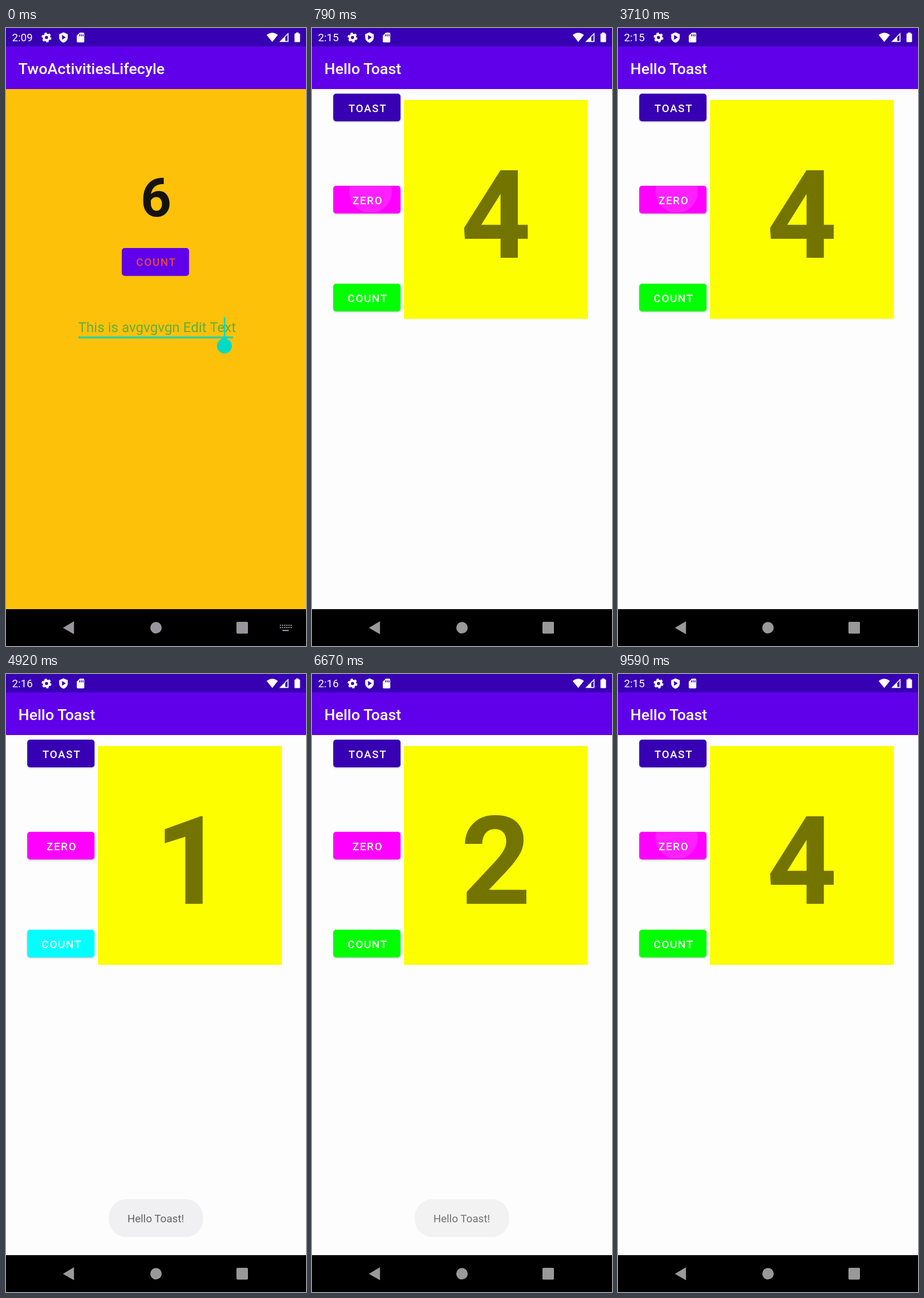
These frames come from a looping animation (522 px wide and 1073 px high, 9.79 s). An HTML page:

```html
<!DOCTYPE html>
<html lang="en">
<head>
<meta charset="utf-8">
<title>Counter app</title>
<style>
  html, body { margin: 0; width: 100%; height: 100%; overflow: hidden; background: #000; }
  svg { display: block; width: 522px; height: 1073px; font-family: Roboto, "Open Sans", sans-serif; }
  .title { font-size: 26.67px; font-weight: 500; fill: #fff; }
  .label { font-size: 18.67px; font-weight: 500; letter-spacing: 1.67px; text-anchor: middle; fill: #fff; }
  .small { font-size: 18.67px; }
  .digit { font-weight: 700; text-anchor: middle; }
  .raised { filter: drop-shadow(0 1.5px 1.5px rgba(0, 0, 0, .28)); }
</style>
</head>
<body>
<svg viewBox="0 0 522 1073">
  <defs>
    <clipPath id="zeroClip"><rect x="37" y="274" width="117" height="48" rx="5"/></clipPath>
  </defs>

  <rect id="page" width="522" height="1073" fill="#fdfdfd"/>
  <rect width="522" height="32" fill="#3700b3"/>
  <rect y="32" width="522" height="74" fill="#6000ea"/>
  <text id="clock" class="small" x="10.5" y="23" fill="#fff">2:15</text>
  <text id="title" class="title" x="21.5" y="80">Hello Toast</text>

  <!-- status icons -->
  <g fill="#fff">
    <circle cx="70.5" cy="16.5" r="4.7" fill="none" stroke="#fff" stroke-width="4"/>
    <circle cx="70.5" cy="16.5" r="7.2" fill="none" stroke="#fff" stroke-width="2.6" stroke-dasharray="4 3.54"/>
    <path d="M100 7.5l7.5 3.3v5.2c0 4.6-3.2 8.3-7.5 9.5-4.3-1.2-7.5-4.9-7.5-9.5v-5.2z"/>
    <path d="M97.5 12l6.5 4.3-6.5 4.3z" fill="#3700b3"/>
    <path d="M128.5 8h6q1.7 0 1.7 1.7v13.6q0 1.7-1.7 1.7h-9.6q-1.7 0-1.7-1.7V13.3z"/>
    <path d="M128 11v3.4M131 11v3.4M134 11v3.4" stroke="#3700b3" stroke-width="1.5"/>
    <path d="M453.5 12q9.8-7.6 19.6 0L463.3 24.3z"/>
    <path d="M475.5 24.3L491.5 8v16.3z"/>
    <path d="M486 15.5l3.8-3.6v10.7H486z" fill="#3700b3"/>
    <path d="M504.5 7.8h4.6v1.8h1.5q1 0 1 1v13q0 1-1 1H503q-1 0-1-1v-13q0-1 1-1h1.5z"/>
  </g>

  <!-- toast screen -->
  <g id="toastScreen">
    <rect x="160" y="125" width="320" height="380" fill="#fdff00"/>
    <text id="count" class="digit" x="320" y="398.5" font-size="213.3" fill="#737400"></text>
    <g class="raised">
      <rect x="37" y="114" width="117" height="48" rx="5" fill="#3700b3"/>
      <rect id="zeroButton" x="37" y="274" width="117" height="48" rx="5"/>
      <rect id="countButton" x="37" y="444" width="117" height="48" rx="5"/>
    </g>
    <circle id="ripple" cx="102" cy="284" r="37" fill="#fff" opacity=".12" clip-path="url(#zeroClip)"/>
    <text class="label" x="97" y="145.5">TOAST</text>
    <text class="label" x="97" y="305.5">ZERO</text>
    <text class="label" x="97" y="475.5">COUNT</text>
    <g id="toast">
      <rect x="179" y="912" width="164" height="65.5" rx="30" fill="#ebebee"/>
      <text class="small" x="260.5" y="952" text-anchor="middle" fill="#161616">Hello Toast!</text>
    </g>
  </g>

  <!-- edit screen -->
  <g id="editScreen">
    <text class="digit" x="261" y="327" font-size="93.3" fill="#15130c">6</text>
    <rect x="201.5" y="382" width="117" height="48.5" rx="5" fill="#6000ea"/>
    <text class="label" x="261.5" y="413" style="fill:#e94a3c">COUNT</text>
    <text x="125.5" y="527.5" font-size="24" fill="#63ad3a">This is avgvgvgn Edit Text</text>
    <rect x="126" y="535.5" width="269" height="3.5" fill="#2fcfa4"/>
    <path d="M379 502h2.6v36H379z" fill="#03dac5"/>
    <path d="M380 536.5l9.2 6.3a13 13 0 1 1-18.4 0z" fill="#03dac5"/>
  </g>

  <!-- navigation bar -->
  <rect y="1009" width="522" height="64"/>
  <g id="nav">
    <path d="M99 1041.5l19.3-11.5v22.5z"/>
    <circle cx="261" cy="1041.3" r="10"/>
    <rect x="401" y="1031" width="20" height="20.5" rx="1.8"/>
  </g>
  <g id="keyboard" stroke="#9a949f" stroke-width="2.2" fill="none">
    <path d="M476.5 1037h21M476.5 1041h21" stroke-dasharray="2.2 1.5"/>
    <path d="M481 1046h11"/>
  </g>
</svg>
<script>
const LOOP = 9790;
const el = id => document.getElementById(id);
const show = (id, on) => el(id).setAttribute("visibility", on ? "visible" : "hidden");
const fill = (id, color) => el(id).setAttribute("fill", color);

// Bursts of flicker: first change, last change, number of changes
const bursts = [
  [40, 790, 19], [840, 1000, 5], [1040, 1960, 21], [2040, 2250, 5], [2380, 3000, 12],
  [3090, 3250, 5], [3460, 3710, 6], [3750, 4420, 10], [4460, 4920, 11], [4960, 5340, 8],
  [5460, 5630, 3], [5880, 5880, 1], [6130, 6670, 12], [6880, 7590, 15],
  [7750, 7960, 5], [8170, 8920, 16], [9130, 9590, 9]
];
const changes = [0];
for (const [first, last, n] of bursts)
  for (let i = 0; i < n; i++)
    changes.push(Math.round(first + (last - first) * i / Math.max(1, n - 1)));

const oldScreen = { clock: "2:15", count: 4, ripple: true, toast: 0 };

function liveScreen(t) {
  const toast = Math.min((t - 4800) / 180, (6742 - t) / 120);
  return {
    clock: t < 3460 ? "2:15" : "2:16",
    count: t < 4000 ? 0 : t < 6200 ? 1 : 2,
    ripple: false,
    toast: Math.max(0, Math.min(1, toast))
  };
}

function drawEdit() {
  el("clock").textContent = "2:09";
  el("title").textContent = "TwoActivitiesLifecyle";
}

function drawToast(s) {
  el("clock").textContent = s.clock;
  el("title").textContent = "Hello Toast";
  el("count").textContent = s.count;
  fill("zeroButton", s.count ? "#ff00ff" : "#444444");
  fill("countButton", s.count % 2 ? "#00ffff" : "#00ff00");
  show("ripple", s.ripple);
  el("toast").setAttribute("opacity", s.toast);
}

let shown = -1;
function frame(now) {
  const t = now % LOOP;
  let step = changes.length - 1;
  while (changes[step] > t) step--;
  if (step !== shown) {
    shown = step;
    const edit = step === 0;
    el("toastScreen").style.display = edit ? "none" : "";
    el("editScreen").style.display = edit ? "" : "none";
    show("keyboard", edit);
    fill("page", edit ? "#fdc10a" : "#fdfdfd");
    fill("nav", edit ? "#9a949f" : "#999999");
    if (edit) drawEdit();
    else drawToast(step % 2 ? oldScreen : liveScreen(changes[step]));
  }
  requestAnimationFrame(() => frame(performance.now() - start));
}
const start = performance.now();
frame(0);
</script>
</body>
</html>
```
